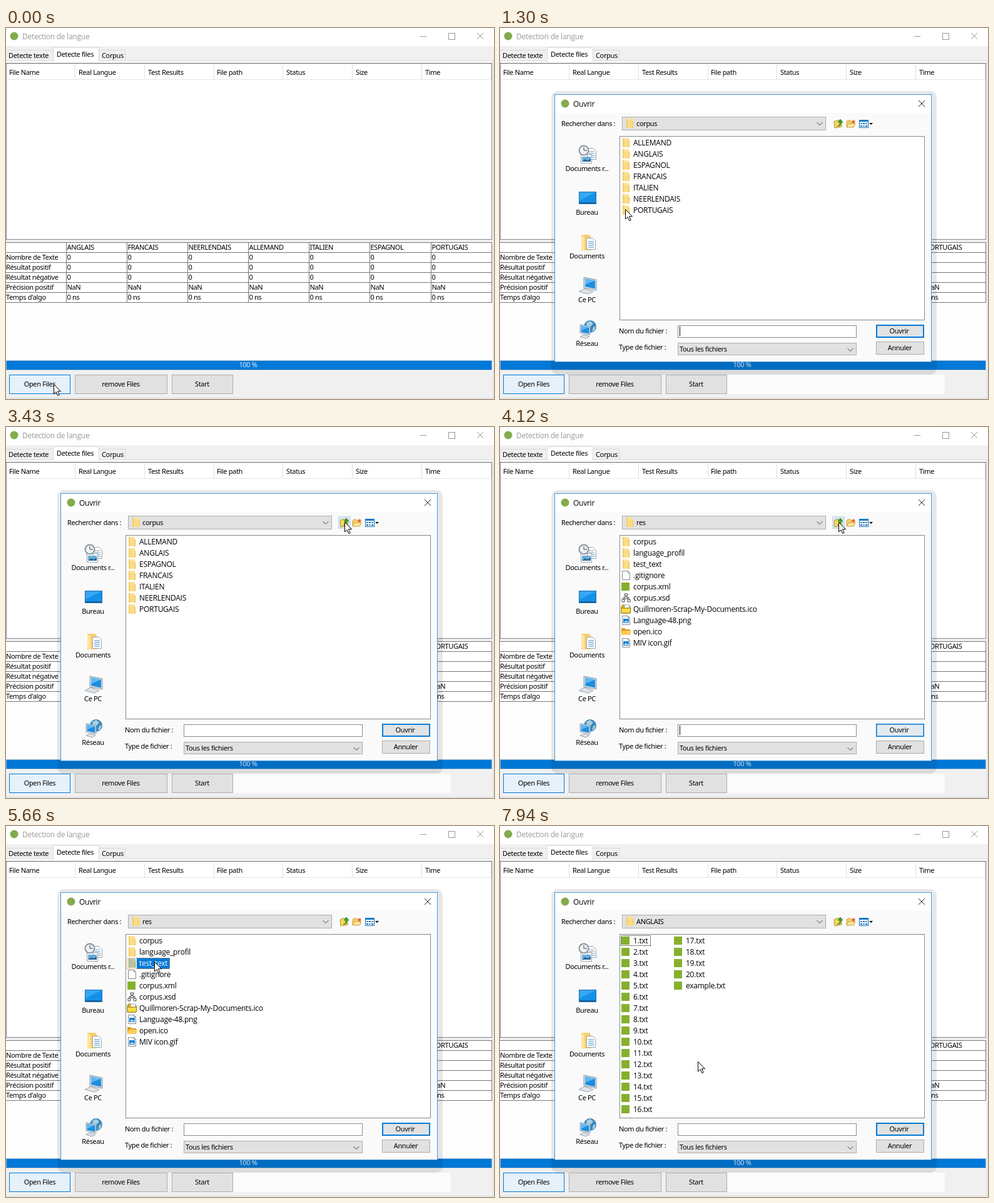
An HTML page for the animation above (8 s loop, 780 by 594 pixels).

```html
<!DOCTYPE html>
<html lang="fr">
<head>
<meta charset="utf-8">
<title>Detection de langue</title>
<style>
html, body { margin: 0; width: 100%; height: 100%; overflow: hidden; background: #f0f0f0; }
svg { display: block; width: 780px; height: 594px; }
text { font: 11px "Noto Sans", "Open Sans", sans-serif; letter-spacing: -.35px; white-space: pre; }
.ui { font: 12px "Open Sans", "Noto Sans", sans-serif; letter-spacing: -.25px; }
.mid { text-anchor: middle; }
.crisp, rect { shape-rendering: crispEdges; }
.soft { shape-rendering: auto; }
.anim { animation-duration: 8s; animation-iteration-count: infinite; animation-timing-function: step-end; }
#dialog { transform-origin: 389px 320px; }
#glow { animation-timing-function: linear; }
</style>
</head>
<body>
<svg id="stage" viewBox="0 0 780 594" xmlns="http://www.w3.org/2000/svg">
<defs>
  <g id="folder">
    <path d="M1 0h9l1 2v13H1z" fill="#fbdc86"/><path d="M1 0h2v15H1z" fill="#f3cd6c"/>
    <path d="M10 4h2.5v11H10z" fill="#f8d273"/><path d="M3 1h6v1H3z" fill="#fff0bd"/>
  </g>
  <g id="page"><path d="M.5 .5h9l3 3v11H.5z" fill="#fff" stroke="#8a8a8a"/><path d="M9.5 .5v3h3" fill="none" stroke="#8a8a8a"/></g>
  <g id="note"><path d="M0 1h13v13H0z" fill="#86b02c"/></g>
  <g id="tree"><path d="M6.5 3v4M2 11V7h9v4" fill="none" stroke="#555"/>
    <path d="M4 1h5v3H4zM0 10h4v4H0zM9 10h4v4H9zM4 6h5v3H4z" fill="#fff" stroke="#444"/></g>
  <g id="image"><use href="#page"/><path d="M2 5h9v7H2z" fill="#1683d8"/><path d="M3 11l3-3 2 2 1-1 2 2z" fill="#d9efff"/></g>
  <g id="papers"><path d="M0 4l2-3h4l1 2h7v11H0z" fill="#e5b013" stroke="#8c6a08"/><path d="M5 1h8v5H5z" fill="#fff" stroke="#aaa"/><path d="M0 6h15l-1 8H0z" fill="#ffdc45" stroke="#9b7810"/></g>
  <g id="opened"><path d="M0 2h5l2 2h7v9H0z" fill="#dc9c20"/><path d="M0 13l2-7h14l-2 7z" fill="#ffcc58"/></g>
  <g id="monitor"><path d="M5 1l20 4v17L5 18z" fill="#d6dce2" stroke="#8797a5"/><path d="M7 3l16 3.500v13L7 16z" fill="#1c8ee0"/><path d="M7 3l16 3.500L7 13z" fill="#5db8f4"/></g>
</defs>
</svg>
<script>
const rect = (x, y, w, h, fill, more = '') => `<rect x="${x}" y="${y}" width="${w}" height="${h}" fill="${fill}" ${more}/>`;
const box = (x, y, w, h, fill, stroke) => rect(x + .5, y + .5, w - 1, h - 1, fill, `stroke="${stroke}"`);
const path = (d, stroke, fill = 'none', more = '') => `<path d="${d}" fill="${fill}" stroke="${stroke}" ${more}/>`;
const label = (x, y, s, cls = '', fill = '#000') => `<text x="${x}" y="${y}" class="${cls}" fill="${fill}">${s}</text>`;
const ui = (x, y, s) => label(x, y, s, 'ui');
const icon = (name, x, y) => `<use href="#${name}" x="${x}" y="${y}"/>`;
const group = (id, body) => `<g id="${id}" class="anim">${body}</g>`;
const cross = (x, y, stroke) => path(`M${x} ${y}l10 10m0-10l-10 10`, stroke);
const button = (x, y, w, h, s) => box(x, y, w, h, '#e1e1e1', '#adadad') + label(x + w / 2 - .5, y + h / 2 + 3.5, s, 'mid');
const badge = (x, y) => `<circle cx="${x}" cy="${y}" r="6.5" fill="#83ab4d"/>`;

const languages = ['ANGLAIS', 'FRANCAIS', 'NEERLENDAIS', 'ALLEMAND', 'ITALIEN', 'ESPAGNOL', 'PORTUGAIS'];
const columns = [97, 194, 291, 388, 485, 582, 680];

function mainWindow() {
  let s = rect(0, 0, 780, 29, '#fff') + badge(13, 13);
  s += group('caption', label(26, 18, 'Detection de langue', 'ui', 'currentColor') +
    path('M662 13.5h10M707.5 8.500h10v10h-10z', 'currentColor', 'none', 'class="crisp"') + cross(753, 8, 'currentColor'));

  s += box(-1, 35, 77, 19, '#f0f0f0', '#d9d9d9') + box(148, 35, 43, 19, '#f0f0f0', '#d9d9d9');
  s += rect(0, 52, 779, 541, '#d9d9d9') + rect(0, 53, 778, 539, '#fdfdfd') + box(75, 31, 74, 23, '#fff', '#d9d9d9') + rect(76, 52, 72, 3, '#fff');
  s += label(4, 48, 'Detecte texte') + label(81, 46, 'Detecte files') + label(153, 48, 'Corpus');

  s += box(0, 56, 777, 283, '#fff', '#828790') + rect(0, 56, 777, 1, '#666') + rect(1, 82, 775, 1, '#e5e5e5');
  ['File Name', 'Real Langue', 'Test Results', 'File path', 'Status', 'Size', 'Time'].forEach((name, i) => {
    const x = Math.round(5 + i * 110.8);
    s += label(x, 75, name) + rect(x + 105, 58, 1, 24, '#e0e0e0');
  });

  s += rect(0, 339, 778, 4, '#f0f0f0') + rect(0, 343, 777, 97, '#fff');
  for (let y = 343; y < 440; y += 16) s += rect(0, y, 777, 1, '#777');
  [...columns, 777].forEach(x => s += rect(x - 1, 343, 1, 97, '#777'));
  ['Nombre de Texte', 'Résultat positif', 'Résultat négative', 'Précision positif', "Temps d'algo"]
    .forEach((name, i) => s += label(0, 371 + i * 16, name));
  columns.forEach((x, i) => [languages[i], '0', '0', '0', 'NaN', '0 ns']
    .forEach((value, row) => s += label(x + .5, 355 + row * 16, value)));

  s += box(0, 532, 777, 16, '#0078d7', '#9fb7cb') + label(387, 543, '100 %', 'mid', '#e2effa');
  s += rect(0, 549, 778, 43, '#f0f0f0') + group('pale', rect(363, 555, 348, 31, '#fbfbfb'));
  s += box(5, 555, 98, 31, '#e5f1fb', '#0078d7') + group('pressed', box(5, 555, 98, 31, '#cce4f7', '#005499'));
  s += label(54, 574, 'Open Files', 'mid');
  return s + button(110, 555, 148, 31, 'remove Files') + button(265, 555, 98, 31, 'Start');
}

function places() {
  let s = ['Documents r...', 'Bureau', 'Documents', 'Ce PC', 'Réseau']
    .map((name, i) => label(139, 229 + i * 70, name, 'mid')).join('');
  // recent documents
  s += path('M139.500 192.500h9l5 5v13h-14zM129.500 202.500h17v14h-17z', '#9aa4ad', '#fff') + rect(131, 206, 14, 8, '#6aaede') +
    path('M131 214l5-4 4 2 5-3v5z', 'none', '#2d6796') + path('M142 198h8m-8 3h9m-4 3h5m-5 3h5', '#6f9fc5');
  s += '<circle cx="134" cy="196" r="7.5" fill="#eef2f5" stroke="#8c949b" stroke-width="2"/>' + path('M134 191v5h5', '#444');
  // desktop
  s += box(126, 262, 28, 20, '#1590e8', '#1b6fae') + path('M127 263h26l-26 13z', 'none', '#35a7f3') + rect(127, 279, 26, 2, '#16629e');
  // documents folder
  s += path('M130 331h13l2 3v22h-15z', 'none', '#f6cf72') + path('M130 331l5 4v22l-5-3z', 'none', '#ffe4a0') +
    path('M138.500 336.500h10l4 4v14h-14z', '#9aa4ad', '#fff') + path('M141 342h9m-9 3h9m-9 3h9m-9 3h9', '#3e8fcb');
  // computer and network
  s += icon('monitor', 129, 398) + path('M126 422l9-5 14 5-8 4z', '#9ba5ad', '#dfe4e8');
  s += '<circle cx="144" cy="478" r="10" fill="#3c86bb"/>' + path('M138 472l6-3 5 4-4 5-6 1zM149 479l4-2-2 7-4 2z', 'none', '#a7cfe0');
  return s + `<g transform="translate(124 474) scale(.8)">${icon('monitor', 0, 0)}</g>` + path('M128 494l7-3 8 3-6 3z', '#9ba5ad', '#dfe4e8');
}

function toolbar() {
  let s = group('hover', box(531, 143, 20, 20, '#d8e6f2', '#c3d9eb'));
  s += path('M534 150l4-2h8v10l-11 2z', '#b08a21', '#ffd75e') + path('M539 157c4 0 4-3 4-6h-3l4-5 4 5h-3c0 5-2 7-6 6z', '#14741b', '#31a63a', 'stroke-width=".6"');
  s += path('M554 150l2-2h4l2 2h4v8h-12z', '#c7a143', '#f6cf68') + path('M554 159l3-6h11l-3 6z', '#c7a143', '#ffe59a') +
    path('M565 147v6m-3-3h6m-5-2l4 4m0-4l-4 4', '#e8501d');
  s += box(574, 147, 15, 13, '#fff', '#0878c8') + rect(574, 147, 15, 3, '#0878c8');
  for (let i = 0; i < 6; i++) s += rect(576 + i % 3 * 4, 152 + (i > 2) * 4, 3, 2, i % 2 ? '#2d5d8d' : '#3f95dd');
  return s + path('M590 152h6l-3 3z', 'none', '#000');
}

// Lists fill downwards, sixteen rows to a column.
function folderView(id, title, files) {
  return group(id, label(218, 157, title) + files.map(([kind, name], i) => {
    const x = 195 + (i >> 4) * 84, y = 176 + i % 16 * 18;
    return icon(kind, x - (kind === 'note' || kind === 'papers' || kind === 'opened' ? 1 : 0), y) + ui(x + 18, y + 12, name);
  }).join(''));
}

function selected(id, row, width, name) {
  const y = 175 + row * 18;
  return group(id, rect(209, y, width, 18, '#0078d7') + rect(195, y + 1, 13, 15, '#0078d7', 'opacity=".25"') +
    rect(193.5, y + .5, width + 15, 17, 'none', 'stroke="#e58a32" stroke-dasharray="1 1"') + label(213, y + 13, name, 'ui', '#fff'));
}

const focusBox = width => rect(193.5, 175.5, width, 16, 'none', 'stroke="#000" stroke-dasharray="1 1"');
const chevron = (x, y) => path(`M${x} ${y}l4.500 4.500 4.500-4.500`, '#444');

function dialog() {
  const folders = names => names.map(name => ['folder', name]);
  const texts = Array.from({ length: 20 }, (_, i) => ['note', `${i + 1}.txt`]);
  let s = rect(82, 101, 616, 454, '#000', 'rx="10" opacity=".09" class="soft"');
  s += box(87, 106, 603, 429, '#fafafa', '#4598d8') + rect(88, 107, 601, 29, '#fff');
  s += badge(104, 121) + ui(117, 126, 'Ouvrir') + cross(669, 116, '#222');
  s += label(98, 157, 'Rechercher dans :') + box(195, 142, 326, 22, '#e1e1e1', '#adadad') + icon('folder', 201, 145) + chevron(506.5, 151);
  s += toolbar() + places() + box(191, 173, 488, 295, '#fff', '#828790');
  s += folderView('corpus', 'corpus', folders([...languages].sort()));
  s += folderView('res', 'res', [...folders(['corpus', 'language_profil', 'test_text']),
    ['page', '.gitignore'], ['note', 'corpus.xml'], ['tree', 'corpus.xsd'], ['papers', 'Quillmoren-Scrap-My-Documents.ico'],
    ['image', 'Language-48.png'], ['opened', 'open.ico'], ['image', 'MIV icon.gif']]);
  s += selected('pickTest', 2, 53, 'test_text');
  s += folderView('tests', 'test_text', folders(['ALLEMAND', 'ANGLAIS', 'FRANCAIS', 'ITALIEN']));
  s += group('focusTests', focusBox(82)) + selected('pickEnglish', 1, 53, 'ANGLAIS');
  s += folderView('english', 'ANGLAIS', [...texts, ['note', 'example.txt']]) + group('focusEnglish', focusBox(47));
  s += label(190, 489, 'Nom du fichier :') + box(284, 476, 286, 20, '#fff', '#8b8b8b') + group('caret', rect(287, 478, 1, 15, '#000'));
  s += label(190, 515, 'Type de fichier :') + box(284, 504, 286, 20, '#e1e1e1', '#adadad') + label(287, 518, 'Tous les fichiers') + chevron(555.5, 513);
  s += box(601, 475, 77, 21, '#0078d7', '#0078d7') + rect(603, 477, 73, 17, '#e1e1e1');
  s += group('glow', box(602, 476, 75, 19, '#e5f1fb', '#b5d9f5')) + label(638, 489, 'Ouvrir', 'mid');
  return group('dialog', s + button(601, 502, 77, 21, 'Annuler'));
}

const arrow = path('M.5 .5v15.500l3.600-3.400 2.700 6 2.400-1-2.700-5.900h5z', '#000', '#fff');
const stage = document.getElementById('stage');
stage.innerHTML += mainWindow() + dialog() + group('pointer', arrow);

// Keys are [milliseconds, value] pairs within the eight second loop.
let css = '';
const animate = (id, keys, rule) => {
  css += `@keyframes ${id}{${keys.map(([t, v]) => `${t / 80}%{${rule(v)}}`).join('')}}#${id}{animation-name:${id}}\n`;
};
const fade = (id, keys) => animate(id, keys, v => `opacity:${v}`);
const show = (id, from, to = 8000) => fade(id, [[0, 0], [from, 1], [to, to < 8000 ? 0 : 1], [8000, to < 8000 ? 0 : 1]]);

animate('caption', [[0, '#999'], [420, '#000'], [730, '#999'], [8000, '#999']], v => `color:${v}`);
fade('pressed', [[0, 0], [420, 1], [880, .5], [1030, 0], [8000, 0]]);
animate('dialog', [[0, [0, .99]], [880, [.86, .993]], [1030, [1, 1]], [8000, [1, 1]]], ([o, k]) => `opacity:${o};transform:scale(${k})`);
show('pale', 880);
show('corpus', 880, 3980);
show('hover', 3430, 4540);
show('res', 3980, 5810);
show('pickTest', 5520, 5810);
show('tests', 5810, 7550);
show('focusTests', 5810, 7280);
show('pickEnglish', 7280, 7550);
show('english', 7550);
show('focusEnglish', 7550);
const blinks = [[0, 0]];
for (let t = 780; t < 5520; t += 1060) blinks.push([t, 1], [Math.min(t + 530, 5520), 0]);
fade('caret', [...blinks, [8000, 0]]);
fade('glow', [[0, .9], [240, 1], [1340, 0], [2440, 1], [3540, 0], [4640, 1], [5740, 0], [6840, 1], [7940, 0], [8000, 0]]);
animate('pointer', [
  [0, [76, 570]], [1180, [130, 430]], [1300, [200, 290]], [1420, [241, 214]], [1580, [243, 209]], [1730, [242, 208]],
  [2010, [240, 210]], [2290, [238, 211]], [2740, [240, 211]], [2890, [262, 206]], [3020, [330, 190]], [3160, [420, 172]],
  [3300, [500, 158]], [3430, [541, 152]], [4540, [480, 165]], [4690, [350, 195]], [4840, [262, 215]], [4970, [240, 218]],
  [5100, [237, 217]], [6210, [238, 208]], [6340, [236, 190]], [6480, [232, 180]], [6610, [228, 186]], [6740, [225, 195]],
  [6880, [224, 201]], [7680, [240, 250]], [7810, [300, 350]], [7940, [316, 377]], [8000, [316, 377]]
], ([x, y]) => `transform:translate(${x}px,${y}px)`);
document.head.insertAdjacentHTML('beforeend', `<style>${css}</style>`);
</script>
</body>
</html>
```
